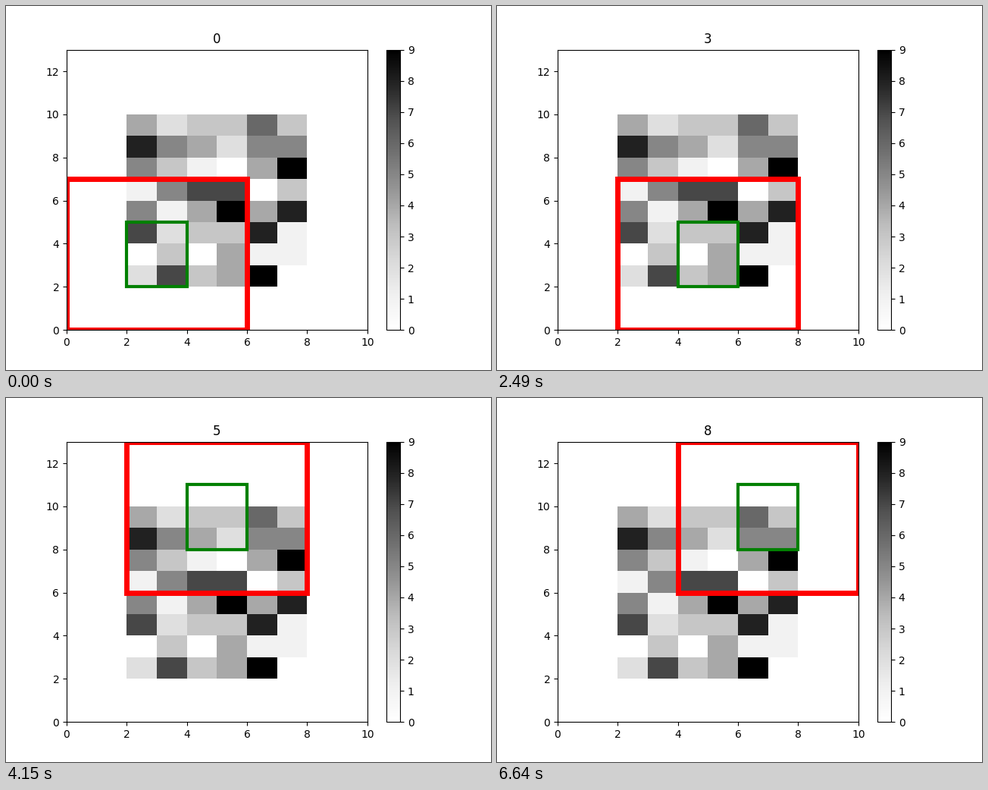
Write a matplotlib script that moves like this. It is 640 px wide and 480 px high and loops after 7.47 s.

```python
import numpy as np
import matplotlib.pyplot as plt
from matplotlib.animation import FuncAnimation
from matplotlib.patches import Rectangle

COLS, ROWS = 10, 13
PAD = 2
STEP_X, STEP_Y = 2, 3
STEPS_X, STEPS_Y = 3, 3
STEP_MS = 830

# Cell values, bottom row first
CELLS = ["273490", "030411", "723381", "514948",
         "157703", "531049", "854255", "423363"]

grid = np.zeros((ROWS, COLS))
grid[PAD:PAD + len(CELLS), PAD:PAD + len(CELLS[0])] = [
    [int(c) for c in row] for row in CELLS]

plt.rcParams["font.family"] = "DejaVu Sans"
fig, ax = plt.subplots(figsize=(6.4, 4.8), dpi=100)
mesh = ax.pcolormesh(grid, cmap="Greys", vmin=0, vmax=9)
fig.colorbar(mesh, ax=ax, ticks=range(10))
ax.set_xlim(0, COLS)
ax.set_ylim(0, ROWS)
title = ax.set_title("0")


def add_box(width, height, color, lw):
    box = Rectangle((0, 0), width, height, fill=False, ec=color, lw=lw)
    return ax.add_patch(box)


outer = add_box(STEP_X + 2 * PAD, STEP_Y + 2 * PAD, "red", 5)
inner = add_box(STEP_X, STEP_Y, "green", 3)


def update(i):
    """Move the window up each column of blocks, then one column right."""
    col, row = divmod(i, STEPS_Y)
    x, y = col * STEP_X, row * STEP_Y
    outer.set_xy((x, y))
    inner.set_xy((x + PAD, y + PAD))
    title.set_text(str(i))
    return outer, inner, title


def init():
    return update(0)


anim = FuncAnimation(fig, update, frames=STEPS_X * STEPS_Y, init_func=init,
                     interval=STEP_MS, repeat=True, repeat_delay=0, blit=False)
plt.show()
```
